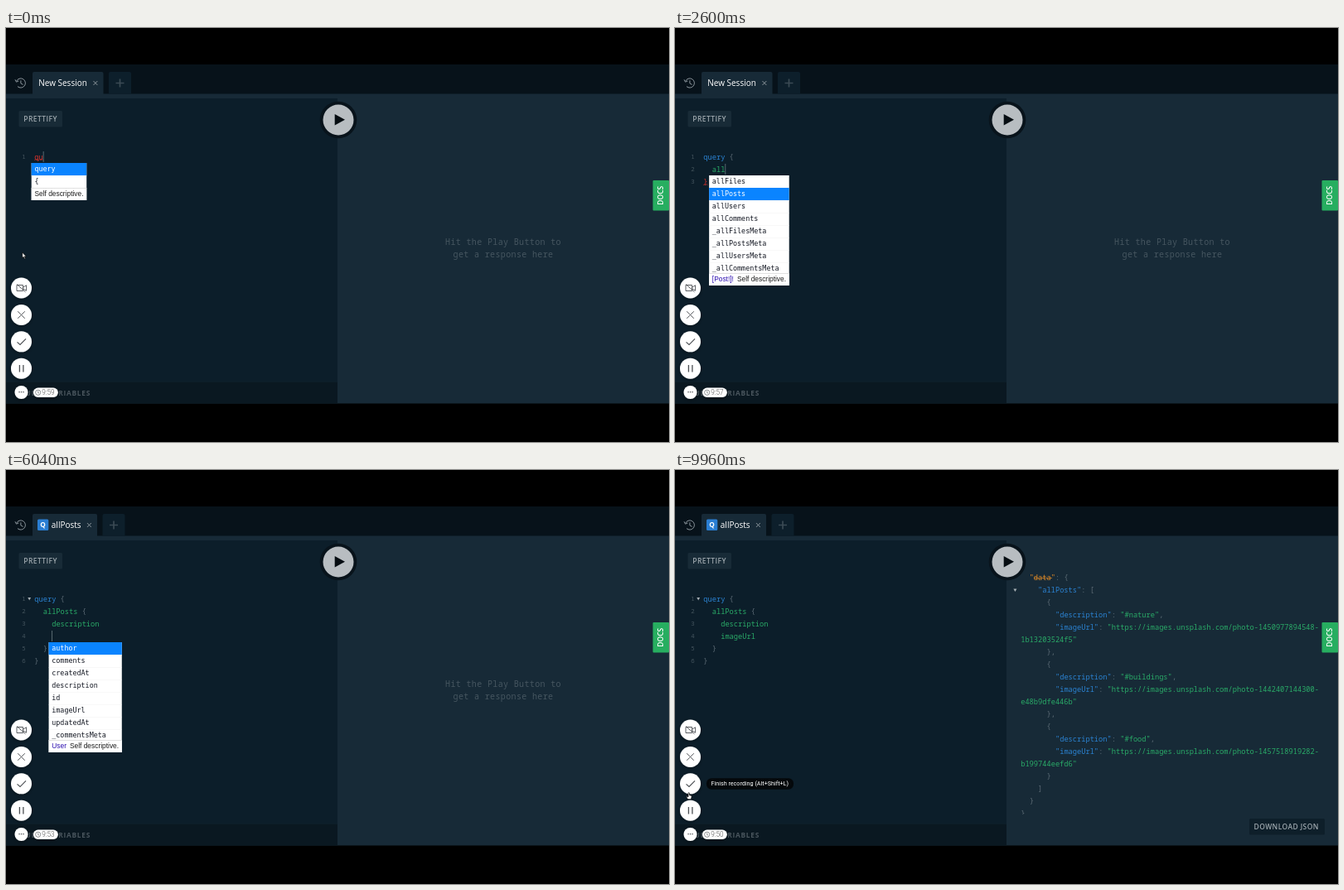
Recreate the animation shown at these times as an HTML page. Size 800 by 500 pixels, loop 10000 ms.

```html
<!DOCTYPE html>
<html lang="en">
<head>
<meta charset="utf-8">
<title>Query editor session</title>
<style>
  html, body { margin: 0; width: 100%; height: 100%; overflow: hidden; background: #000; }
  svg { display: block; width: 100vw; height: 100vh; }
  text { white-space: pre; }
  .code { font: 8.7px "Noto Sans Mono", monospace; }
  .hint { font: 8.4px "DejaVu Sans Mono", monospace; }
  .note { font: 8.4px "Liberation Sans", sans-serif; }
  .num { font: 7.4px "Noto Sans Mono", monospace; fill: #44545d; text-anchor: end; }
  .tab { font: 10px "Open Sans", sans-serif; fill: #fff; }
  .caps { font: 600 8.5px "Open Sans", sans-serif; letter-spacing: .4px; fill: #9ca6ac; }
  .idle { font: 10px "Noto Sans Mono", monospace; letter-spacing: .36px; fill: #465660; text-anchor: middle; }
  .tip { font: 7.2px Roboto, sans-serif; fill: #fff; }
  .clock { font: 300 8.2px Roboto, sans-serif; fill: #555; }
  .icon { fill: none; stroke: #4b4f53; stroke-width: .9; }
</style>
</head>
<body>
<svg viewBox="0 0 800 500" xmlns="http://www.w3.org/2000/svg">
  <defs>
    <clipPath id="pane"><rect x="400" y="122" width="400" height="294"/></clipPath>
    <filter id="soft" x="-50%" y="-50%" width="200%" height="200%">
      <feDropShadow dx="0" dy="1" stdDeviation="2" flood-color="#000" flood-opacity=".45"/>
    </filter>
  </defs>
  <rect width="800" height="500"/>
  <rect y="44" width="800" height="36" fill="#07121a"/>
  <rect y="79.5" width="800" height="374" fill="#172a37"/>
  <rect y="85" width="400" height="342.5" fill="#0c1e2a"/>
  <rect y="427.5" width="400" height="26" fill="#0a1821"/>

  <g fill="none" stroke="#8c969d">
    <path d="M12.7 64.2A5.6 5.6 0 1 1 14 70.6M17.9 63.3V66.9L20.6 68.4"/>
    <path d="M11 62.3L12.5 65.2L15.4 63.9"/>
  </g>
  <g id="tabs"></g>

  <rect x="15.5" y="100" width="52.5" height="19.5" rx="1.5" fill="#182b37"/>
  <text class="caps" x="21.3" y="113">PRETTIFY</text>
  <text class="caps" x="102" y="443.5" style="font-weight:700;font-size:8.4px;letter-spacing:.7px;fill:#4a565e;text-anchor:end">QUERY VARIABLES</text>

  <g id="result"></g>
  <circle cx="401" cy="111" r="22.3" fill="#08131b"/>
  <circle cx="401" cy="111" r="18.5" fill="#b8bdc1"/>
  <path d="M396.7 104L409 110.8L396.7 117.6Z" fill="#060d12"/>
  <rect x="780.5" y="184" width="19.5" height="36.5" rx="1" fill="#27ae60"/>
  <text class="caps" transform="translate(793.3 213.7) rotate(-90)" style="fill:#fff;letter-spacing:0">DOCS</text>

  <g id="editor"></g>

  <g filter="url(#soft)" fill="#fff">
    <circle cx="18.5" cy="314" r="12.5"/>
    <circle cx="18.5" cy="346.5" r="12.5"/>
    <circle cx="18.5" cy="378.8" r="12.5"/>
    <circle cx="18.5" cy="411.2" r="12.5"/>
    <circle cx="18.5" cy="440" r="8"/>
    <rect x="33" y="434.5" width="29.8" height="11.5" rx="5.7"/>
  </g>
  <g class="icon">
    <path d="M13 310.5H20.5V317.5H13ZM20.5 313.2L24.6 310.8V317.2L20.5 314.8M13 309.5L23.5 318.8"/>
    <path d="M14.2 342.2L22.8 350.8M22.8 342.2L14.2 350.8"/>
    <path d="M13.5 379.3L17 382.5L24 375.3" stroke-width="1.1"/>
    <path d="M16.4 407V415.6M20.9 407V415.6" stroke-width="1.3"/>
    <path d="M15.4 439.6H22" stroke-width="1.3" stroke-dasharray="1.3 1.2"/>
    <path d="M38.7 438.4V440.4L40 441" stroke-width=".6"/>
    <circle cx="38.7" cy="440.2" r="3.1" stroke-width=".6"/>
  </g>
  <text id="clock" class="clock" x="43.3" y="443.2"></text>

  <g id="tip">
    <rect x="38" y="372.3" width="105" height="13.4" rx="6" fill="#04080b"/>
    <text class="tip" x="43.5" y="381.2">Finish recording (Alt+Shift+L)</text>
  </g>
  <g id="mouse" stroke="#000" stroke-width=".7" fill="#fff">
    <path id="arrow" d="M0 0V6.6L1.5 5.3L2.6 7.7L3.7 7.2L2.6 4.9H4.6Z"/>
    <path id="hand" d="M-.7 .3Q0 -.5 .7 .3V3L3 3.6Q3.6 4 3.4 5.2L2.6 8H-1.2L-3 5Q-2.6 4 -.7 5.1Z"/>
  </g>
</svg>
<script>
const LOOP = 10000, CW = 5.22, ROW = 15, LEFT = 34.3, TOP = 155.5;
const GREEN = '#2aab68', BLUE = '#2b83d3', GREY = '#5d6c76', RED = '#d8322b', ORANGE = '#e08a26';
const $ = id => document.getElementById(id);
const text = (cls, x, y, fill, s) => `<text class="${cls}" x="${x}" y="${y}" fill="${fill}">${s}</text>`;
const rect = (x, y, w, h, fill) => `<rect x="${x}" y="${y}" width="${w}" height="${h}" fill="${fill}"/>`;

const ruler = document.createElement('canvas').getContext('2d');
const noteWidth = s => {
  ruler.font = '8.4px "Liberation Sans", sans-serif';
  return ruler.measureText(s).width;
};

// Completion lists; "name:Type" gives the type in the footer.
const hints = {
  start: ['query', '{'],
  all: ['allFiles:[File!]!', 'allPosts:[Post!]!', 'allUsers:[User!]!', 'allComments:[Comment!]!',
    '_allFilesMeta', '_allPostsMeta', '_allUsersMeta', '_allCommentsMeta'],
  de: ['description:String', 'updatedAt:DateTime', 'id:ID!'],
  fields: ['author:User', 'comments:[Comment!]!', 'createdAt:DateTime', 'description:String',
    'id:ID!', 'imageUrl:String', 'updatedAt:DateTime', '_commentsMeta']
};

// [start, code, cursor row, hint list, selected item]; "!" marks a faulty token.
const root = s => `query {\n  ${s}\n!}`;
const posts = s => `query {\n  allPosts {\n    ${s}\n  }\n}`;
const two = s => posts('description\n    ' + s);
const steps = [
  [0, '!qu', 0, 'start', 0],
  [100, '!que', 0, 'start', 0],
  [200, '!quer', 0, 'start', 0],
  [320, 'query', 0, 'start', 0],
  [520, 'query ', 0],
  [720, 'query {|!}', 0],
  [1000, root(''), 1],
  [1480, root('a'), 1, 'all', 0],
  [1640, root('al'), 1, 'all', 0],
  [1800, root('all'), 1, 'all', 0],
  [2480, root('all'), 1, 'all', 1],
  [2760, 'query {\n  allPosts\n}', 1],
  [2920, 'query {\n  allPosts \n}', 1],
  [3360, 'query {\n  allPosts {|!}\n}', 1],
  [3520, posts('').replace('  }', '  !}'), 2],
  [3760, posts('d'), 2, 'de', 0],
  [3880, posts('de'), 2, 'de', 0],
  [4400, posts('description'), 2],
  [5440, two(''), 3],
  [5840, two(''), 3, 'fields', 0],
  [6520, two(''), 3, 'fields', 1],
  [6840, two(''), 3, 'fields', 2],
  [7080, two(''), 3, 'fields', 3],
  [7560, two(''), 3, 'fields', 4],
  [7720, two(''), 3, 'fields', 5],
  [8000, two('imageUrl'), 3]
];
const TITLE_AT = 4600, RUN_AT = 8520, DONE_AT = 8800, BLUR_AT = 9480;

function squiggle(x, y, w) {
  let d = `M${x} ${y}`;
  for (let i = 1; i <= w / 1.3; i++) d += `L${x + i * 1.3} ${y + (i % 2 ? -1.3 : 0)}`;
  return `<path d="${d}" fill="none" stroke="${RED}" stroke-width=".7"/>`;
}

function codeLine(line, y) {
  const marks = /!?[\w]+|!?[{}]/g;
  let out = '', shift = 0;
  for (const m of line.replace('|', '').matchAll(marks)) {
    const bad = m[0][0] === '!', word = m[0].replace('!', '');
    const x = LEFT + (m.index - shift) * CW;
    const fill = bad ? RED : word === 'query' ? BLUE : /\w/.test(word) ? GREEN : GREY;
    out += text('code', x, y + 3, fill, word);
    if (bad) { shift++; out += squiggle(x, y + 4.4, word.length * CW); }
  }
  return out;
}

function popup(x, y, list, pick) {
  const items = hints[list].map(s => s.split(':'));
  const type = items[pick][1] || '';
  const gap = type ? noteWidth(type) + 4 : 0;
  const w = 7.4 + gap + noteWidth('Self descriptive.');
  const h = Math.min(items.length * ROW, 118);
  let out = rect(x, y, w, h + ROW, '#fff');
  items.forEach(([name], i) => {
    const top = y + i * ROW;
    if (i) out += rect(x, top, w, .5, '#f0f0f0');
    if (i === pick) out += rect(x, top, w, ROW, '#0a84ff');
    out += text('hint', x + 3.7, top + 10.2, i === pick ? '#fff' : '#141823', name);
  });
  out += rect(x, y + h, w, ROW, '#fff') + rect(x, y + h, w, .7, '#d5d5d5');
  if (type) out += text('note', x + 3.7, y + h + 10.4, '#2d10b0', type);
  return out + text('note', x + 3.7 + gap, y + h + 10.4, '#1c1c1c', 'Self descriptive.');
}

function editor([start, code, row, list, pick], focus) {
  const lines = code.split('\n');
  let out = '';
  lines.forEach((line, i) => {
    const y = TOP + i * ROW;
    out += text('num', 23.6, y + 2.8, '', i + 1) + codeLine(line, y);
  });
  if (start >= 3520) out += `<path d="M26.3 154H30.1L28.2 157.4Z" fill="#a7afb4"/>`;
  const typed = lines[row].split('|')[0].replace('!', '');
  if (focus) out += rect(LEFT + typed.length * CW, TOP + row * ROW - 6.5, .8, 13, '#6a7a80');
  if (list) out += popup(LEFT + typed.search(/\w*$/) * CW - 3.6, TOP + 7.5 + row * ROW, list, pick);
  return out;
}

function tabs(named) {
  const end = named ? 110 : 117.5, plus = end + 6.5;
  const cross = end - 9.6, mid = plus + 13.5;
  const icon = named ? `<rect x="38" y="59.5" width="13.3" height="13.5" rx="1.5" fill="#2a7ed3"/>
    <text x="44.6" y="69.3" fill="#fff" text-anchor="middle" style="font:700 8.2px 'Open Sans',sans-serif">Q</text>` : '';
  return `<path d="M32 80V55Q32 53 34 53H${end - 2}Q${end} 53 ${end} 55V80Z" fill="#172a37"/>
    <path d="M${plus} 79.5V55Q${plus} 53 ${plus + 2} 53H${plus + 25}Q${plus + 27} 53 ${plus + 27} 55V79.5Z" fill="#0d1f2b"/>
    <path d="M${cross - 2.4} 64.1l4.8 4.8m0 -4.8l-4.8 4.8" stroke="#8f999f"/>
    <path d="M${mid - 5} 66.5h10m-5 -5v10" stroke="#3b4a54" stroke-width="1.7"/>
    ${icon}${text('tab', named ? 54.8 : 39.2, 70, '#fff', named ? 'allPosts' : 'New Session')}`;
}

const base = 'https://images.unsplash.com/photo-';
const photos = [
  ['#nature', '1450977894548-', '1b13203524f5'],
  ['#buildings', '1442407144300-', 'e48b9dfe446b'],
  ['#food', '1457518919282-', 'b199744eefd6']
];
const json = ['  "data": {', '    "allPosts": [',
  ...photos.flatMap(([tag, id, rest], i) => ['      {',
    `        "description": "${tag}",`, `        "imageUrl": "${base}${id}`,
    `${rest}"`, i < 2 ? '      },' : '      }']),
  '    ]', '  }', '}'];

function response() {
  let out = '<g clip-path="url(#pane)">';
  json.forEach((line, i) => {
    const tokens = /"\w+"(?=:)|"[^"]*"?|\w+"|[{}\[\],:]+/g;
    for (const m of line.matchAll(tokens)) {
      const s = m[0], key = line[m.index + s.length] === ':';
      const fill = s === '"data"' ? ORANGE : key ? BLUE : s.includes('"') ? GREEN : GREY;
      out += text('code', 417.2 + m.index * CW, 133 + i * ROW, fill, s);
    }
  });
  out += rect(433, 130.2, 22, .7, ORANGE) + '</g><path d="M408.4 143.5H412.4L410.4 147Z" fill="#a7afb4"/>';
  return out + '<rect x="693" y="421" width="91" height="19.5" rx="1.5" fill="#0e1f2a"/>' +
    text('caps', 698.5, 434, '', 'DOWNLOAD JSON');
}
const idle = text('idle', 600, 262.2, '', 'Hit the Play Button to') +
  text('idle', 600, 277.2, '', 'get a response here');

const cache = {};
function put(id, html) {
  if (cache[id] !== html) $(id).innerHTML = cache[id] = html;
}
const show = (id, on) => $(id).setAttribute('visibility', on ? 'visible' : 'hidden');

function draw(t) {
  put('tabs', tabs(t >= TITLE_AT));
  put('editor', editor(steps.filter(s => s[0] <= t).pop(), t < BLUR_AT));
  put('result', t < RUN_AT ? idle : t < DONE_AT ? '' : response());
  put('clock', '9:' + (59 - Math.floor((t + 64) / 1008)));

  const k = Math.min(1, Math.max(0, (t - 9480) / 320));
  const e = k * k * (3 - 2 * k);
  const x = 19.7 - 3 * e, y = 271 + 118.7 * e;
  const moving = t < 120 || t >= 9400;
  const over = [314, 346.5, 378.8].some(c => Math.hypot(x - 18.5, y - c) < 12.5);
  $('mouse').setAttribute('transform', `translate(${x} ${y})`);
  show('arrow', moving && !over);
  show('hand', moving && over);
  show('tip', t >= 9800);
}

const began = performance.now();
function tick() {
  draw((performance.now() - began) % LOOP);
  requestAnimationFrame(tick);
}
tick();
</script>
</body>
</html>
```
